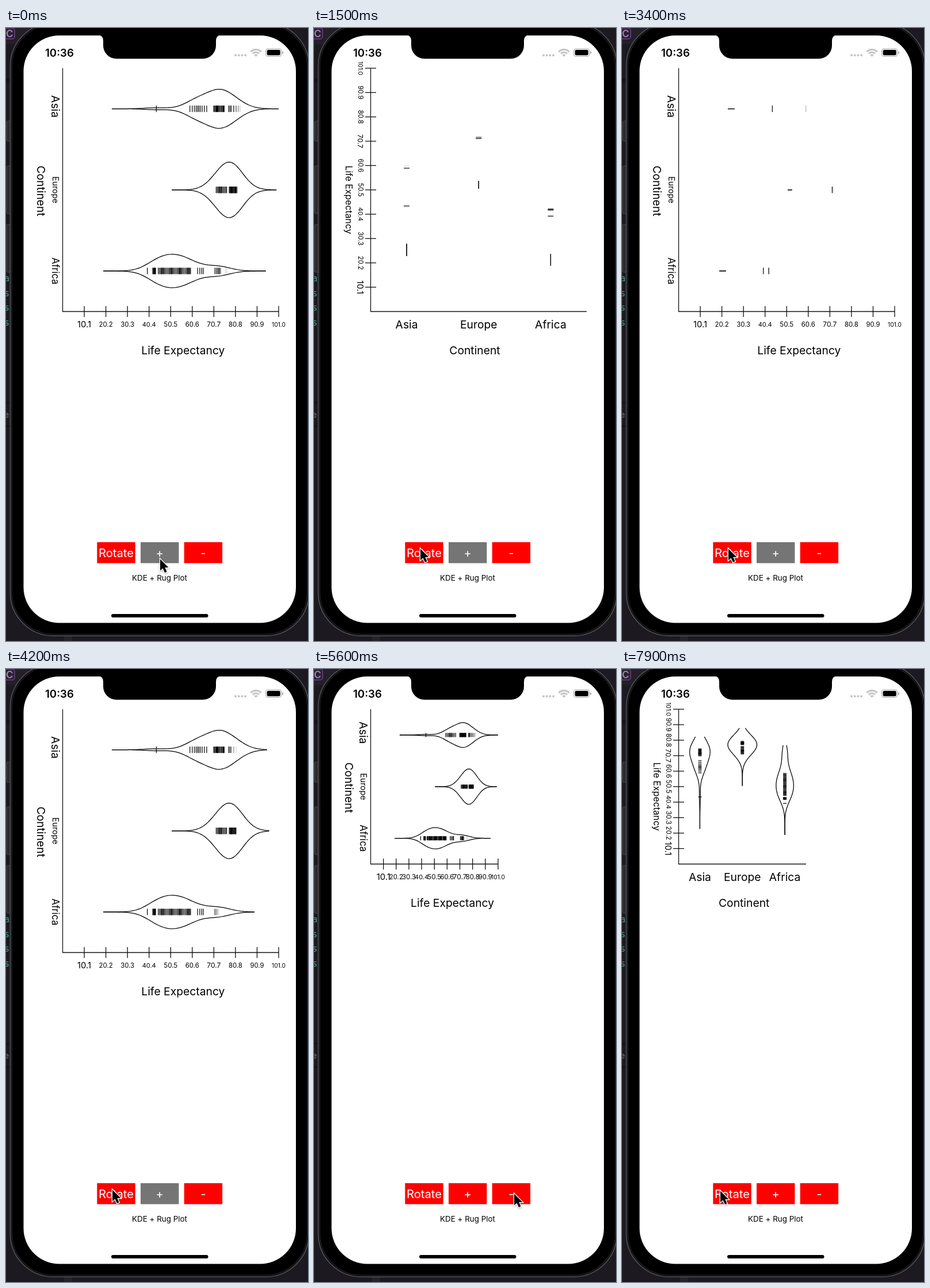
Write an HTML page with a canvas that moves like this. It is 525x1067 px and loops after 8 s.

```html
<!DOCTYPE html>
<html lang="en">
<head>
<meta charset="utf-8">
<title>KDE + Rug Plot</title>
<style>
  html, body { margin: 0; height: 100%; overflow: hidden; background: #1c1a20; }
  canvas { display: block; width: 525px; height: 1067px; }
</style>
</head>
<body>
<canvas id="stage" width="525" height="1067"></canvas>
<script>
const ctx = document.getElementById('stage').getContext('2d');
const SANS = 'Inter, Roboto, sans-serif';
const LOOP = 8000, STEP = 100, DRAW_TIME = 900;
const LEFT = 98.5, TOP = 70, MAX_VALUE = 101;
const BANDWIDTH = 5.4, KDE_SCALE = 0.133, RUG_SCALE = 0.0133;
const LABEL_SIZE = 19.3, SIDE_LABEL_WIDTH = 47, TICK_LABEL_WIDTH = 24, SIDE_TITLE_WIDTH = 119;

const clamp = x => Math.max(0, Math.min(1, x));

// A run of values from low to high, nearly evenly spaced.
const cluster = (count, low, high) => Array.from({ length: count }, (_, i) =>
  low + (high - low) * (i + 0.4 * Math.sin(7 * i)) / Math.max(1, count - 1));

const continent = (name, ...clusters) => {
  const values = clusters.flatMap(c => cluster(...c));
  return { name, values, from: Math.floor(values[0]) - 20, to: Math.floor(values.at(-1)) + 19 };
};

const continents = [
  continent('Asia', [1, 43.8, 43.8], [10, 59.5, 67.3], [15, 70.6, 75.6], [3, 77.6, 78.6], [4, 80, 82.6]),
  continent('Europe', [12, 71.8, 76.5], [18, 77.9, 81.8]),
  continent('Africa', [1, 39.6, 39.6], [6, 42.1, 43.5], [34, 44.7, 60], [4, 63.1, 65.5],
    [6, 71.2, 74], [1, 76.4, 76.4])
];

const rotateClicks = [1441, 3363, 7207];
const shrinkClicks = [4900, 5200, 5400, 5600];
const cursorStart = [267, 923];
const cursorMoves = [
  { start: 100, end: 1300, to: [184, 905] },
  { start: 4200, end: 4700, to: [347, 912] },
  { start: 5800, end: 6100, to: [286, 913] },
  { start: 6700, end: 7100, to: [170, 907] }
];

const density = (values, v) => KDE_SCALE / values.length *
  values.reduce((sum, d) => sum + Math.exp(-(((v - d) / BANDWIDTH) ** 2) / 2), 0);

function line(points, width = 1.3, color = '#111') {
  ctx.beginPath();
  points.forEach(([x, y]) => ctx.lineTo(x, y));
  ctx.lineWidth = width;
  ctx.strokeStyle = color;
  ctx.stroke();
}

function box(x, y, w, h, r, fill, stroke, width = 1) {
  ctx.beginPath();
  ctx.roundRect(x, y, w, h, r);
  if (fill) { ctx.fillStyle = fill; ctx.fill(); }
  if (stroke) { ctx.strokeStyle = stroke; ctx.lineWidth = width; ctx.stroke(); }
}

function text(str, x, y, size, { align = 'left', color = '#000', weight = 400, font = SANS } = {}) {
  ctx.font = `${weight} ${size}px ${font}`;
  ctx.textAlign = align;
  ctx.fillStyle = color;
  ctx.fillText(str, x, y);
}

function sideText(str, x, y, size, align = 'left') {
  ctx.save();
  ctx.translate(x, y);
  ctx.rotate(Math.PI / 2);
  text(str, 0, 0, size, { align });
  ctx.restore();
}

// Labels take a smaller font when they would outgrow their room.
function fontFor(str, room) {
  ctx.font = `${LABEL_SIZE}px ${SANS}`;
  return LABEL_SIZE * Math.min(1, room / ctx.measureText(str).width);
}

const capDrop = size => size * 0.364;

function drawDesktop() {
  ctx.fillStyle = '#1c1a20';
  ctx.fillRect(0, 0, 525, 1067);
  ctx.fillStyle = '#241f28';
  ctx.fillRect(0, 0, 40, 28);
  box(-8, 0, 23, 19, 4, '#2b2033', '#6b3f86', 1.5);
  text('C', 0, 16, 17, { color: '#9a86a6', weight: 600 });
  line([[0, 92], [12, 92]], 8, '#151418');
  for (const y of [652, 693]) line([[0, y], [12, y]], 1, '#09090b');
  const mono = { color: '#4f9c8d', font: 'DejaVu Sans Mono, monospace' };
  [...'asss'].forEach((ch, i) => text(ch, -3, 441 + i * 25.5, 15, mono));
  text('e', -3, 678, 14, { color: '#77757b' });
  line([[108, 1050], [108, 1067]], 14, '#262429');
}

function drawPhone() {
  for (const [y, h] of [[162, 35], [240, 83], [342, 83]]) box(1, y, 9, h, 2, '#2b2b2d', '#48484a');
  box(7.5, -9, 519, 1067, 75, '#000', '#55565a', 1.6);
  box(10, -6.5, 514, 1062, 73, null, '#1d1d1f', 2);
  box(30.5, 13, 473.5, 1022.5, 62, '#fff');

  ctx.beginPath();
  ctx.moveTo(160, 12);
  ctx.quadraticCurveTo(169, 13, 169, 22);
  ctx.arcTo(169, 53.5, 192, 53.5, 23);
  ctx.arcTo(365, 53.5, 365, 29, 23);
  ctx.lineTo(365, 22);
  ctx.quadraticCurveTo(365, 13, 374, 12);
  ctx.fillStyle = '#000';
  ctx.fill();

  text('10:36', 68, 50, 18.6, { weight: 600 });
  for (let i = 0; i < 4; i++) box(397 + i * 5.7, 45.5, 4, 4, 2, '#c4c4c6');
  for (const [r, inner] of [[4.5, 0], [9.3, 6.2], [14, 11]]) {
    ctx.beginPath();
    ctx.arc(434.5, 50, r, -Math.PI * 0.76, -Math.PI * 0.24);
    ctx.arc(434.5, 50, inner, -Math.PI * 0.24, -Math.PI * 0.76, true);
    ctx.fill();
  }
  box(451.7, 36, 27, 13.5, 4, null, '#a3a3a5', 1.1);
  box(453.7, 38, 23, 9.5, 2.3, '#000');
  box(480.2, 40.7, 1.8, 4.4, 1, '#a3a3a5');
  box(183, 1020, 168.5, 6, 3, '#000');
}

function drawChart(upright, progress, shrink) {
  const w = 375.5 - shrink, h = 423.5 - shrink, bottom = TOP + h;
  const across = upright ? w : h;
  const at = (v, lane, offset) => upright
    ? [LEFT + w * lane + offset, bottom - v / MAX_VALUE * h]
    : [LEFT + v / MAX_VALUE * w, TOP + h * lane + offset];

  const belowAxis = (str, x, size) =>
    text(str, x, bottom + 22.6 + capDrop(size), size, { align: 'center' });

  line([[LEFT, TOP], [LEFT, bottom], [LEFT + w, bottom]]);
  for (let i = 1; i <= 10; i++) {
    const value = i * MAX_VALUE / 10, str = value.toFixed(1);
    const size = fontFor(str, TICK_LABEL_WIDTH);
    const [x, y] = at(value, 0, 0);
    if (upright) {
      line([[LEFT - 9.5, y], [LEFT + 9.5, y]]);
      sideText(str, 80.8 - capDrop(size), y, size, 'center');
    } else {
      line([[x, bottom - 9.5], [x, bottom + 9.5]]);
      belowAxis(str, x, size);
    }
  }

  const [xTitle, yTitle] = upright ? ['Continent', 'Life Expectancy'] : ['Life Expectancy', 'Continent'];
  const sideSize = fontFor(yTitle, SIDE_TITLE_WIDTH);
  text(xTitle, 71.2 + 0.437 * w, bottom + 74.7, LABEL_SIZE);
  sideText(yTitle, 61 - capDrop(sideSize), TOP + h / 2 - 42.3, sideSize);

  continents.forEach(({ name, values, from, to }, i) => {
    const lane = (i + 0.5) / 3;
    if (upright) {
      belowAxis(name, LEFT + w * lane, LABEL_SIZE);
    } else {
      const size = fontFor(name, SIDE_LABEL_WIDTH);
      sideText(name, 86 - capDrop(size), TOP + h * lane - SIDE_LABEL_WIDTH / 2, size);
    }

    const end = from + (to - from) * progress;
    for (const side of [-1, 1]) {
      const edge = v => at(v, lane, side * across * density(values, v));
      const points = [];
      for (let v = from; v < end; v++) points.push(edge(v));
      line([...points, edge(end)], 1.25, '#000');
    }

    // The most recently drawn rug marks are still faint.
    const shown = progress * values.length, fade = 1 + 3 * progress;
    const reach = across * RUG_SCALE;
    values.forEach((v, n) => {
      ctx.globalAlpha = clamp((shown - n) / fade);
      line([at(v, lane, -reach), at(v, lane, reach)], 1.2, '#000');
    });
    ctx.globalAlpha = 1;
  });
}

function drawButtons(t) {
  const k = clamp((t - 4800) / 400);
  const grey = 117 * (1 - k);
  const plusColor = `rgb(${117 + 138 * k}, ${grey}, ${grey})`;
  [['Rotate', '#f00'], ['+', plusColor], ['-', '#f00']].forEach(([name, color], i) => {
    const x = 158.3 + i * 75.7;
    box(x, 895, 66.4, 36.5, 0, color);
    text(name, x + 33.2, 921, 20.2, { align: 'center', color: '#fff' });
  });
  text('KDE + Rug Plot', 267, 961.7, 13.4, { align: 'center' });
}

function drawCursor(t) {
  let [x, y] = cursorStart;
  for (const { start, end, to } of cursorMoves) {
    const k = 1 - (1 - clamp((t - start) / (end - start))) ** 3;
    x += (to[0] - x) * k;
    y += (to[1] - y) * k;
  }
  ctx.save();
  ctx.translate(x + 1, y + 1.5);
  ctx.beginPath();
  for (const [px, py] of [[0, 0], [0, 20], [4.6, 16], [8, 23.5], [11.6, 22], [8.3, 14.6], [14.4, 14.6]]) {
    ctx.lineTo(px, py);
  }
  ctx.closePath();
  ctx.shadowColor = 'rgba(0, 0, 0, 0.35)';
  ctx.shadowBlur = 3;
  ctx.shadowOffsetY = 1;
  ctx.lineWidth = 2.6;
  ctx.strokeStyle = '#fff';
  ctx.stroke();
  ctx.shadowColor = 'transparent';
  ctx.fillStyle = '#000';
  ctx.fill();
  ctx.restore();
}

function frame() {
  const t = Math.floor((performance.now() % LOOP) / STEP) * STEP;
  const rotations = rotateClicks.filter(click => click <= t);
  const progress = rotations.length ? clamp((t - rotations.at(-1)) / DRAW_TIME) : 1;
  const shrink = 38.5 * shrinkClicks.filter(click => click <= t).length;
  drawDesktop();
  drawPhone();
  drawChart(rotations.length % 2 === 1, progress, shrink);
  drawButtons(t);
  drawCursor(t);
  requestAnimationFrame(frame);
}
frame();
</script>
</body>
</html>
```
